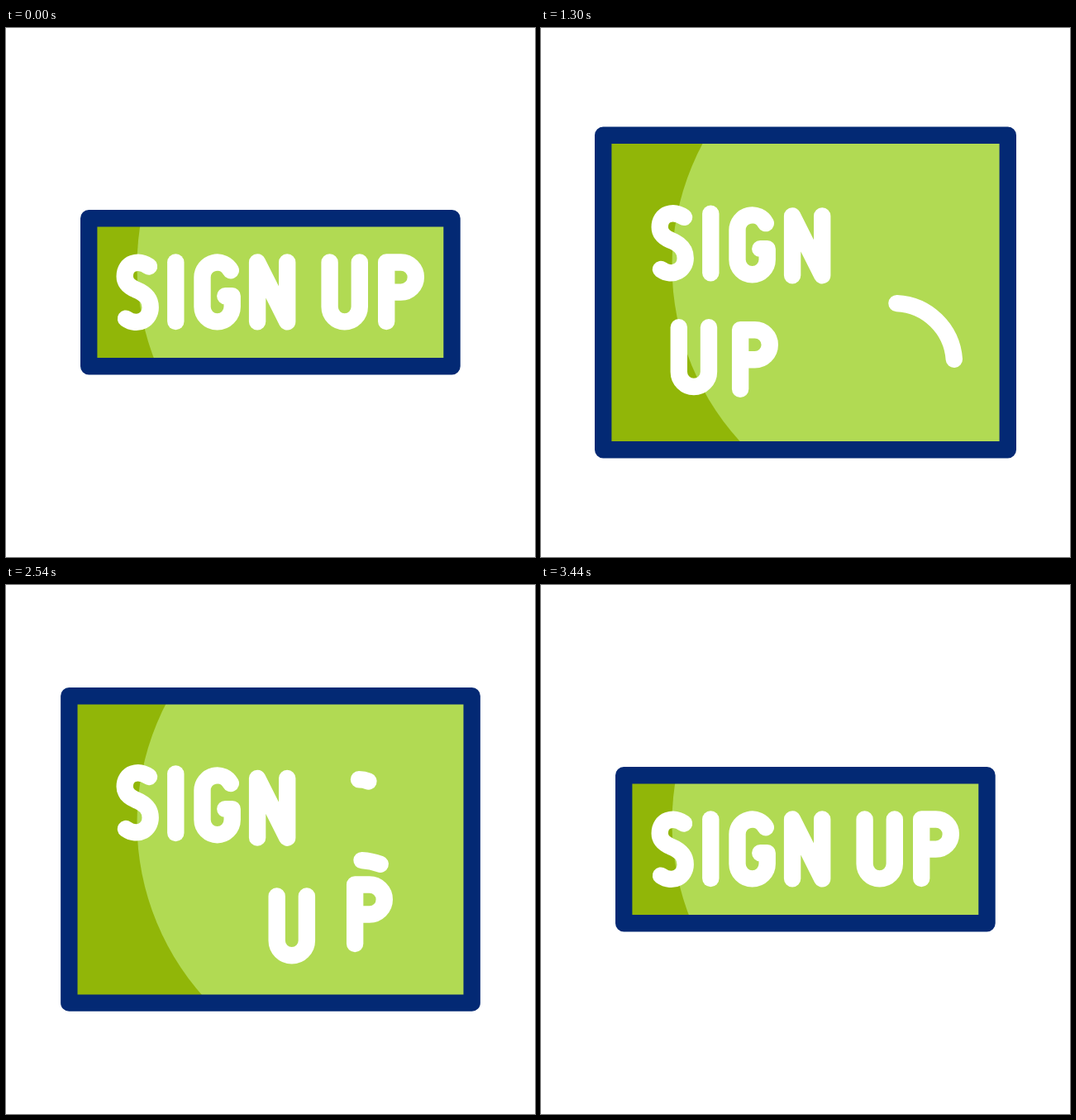
Write an HTML page that moves like this. It is 640 px wide and 640 px high and loops after 3600 ms.

```html
<!DOCTYPE html>
<html lang="en">
<head>
<meta charset="utf-8">
<title>Sign up</title>
<style>
  @property --p { syntax: "<number>"; inherits: true; initial-value: 0; }

  html, body { margin: 0; width: 100%; height: 100%; overflow: hidden; background: #fff; }
  svg { display: block; width: 100vw; height: 100vh; }

  svg, .letter, .trim {
    animation: 3600ms cubic-bezier(.95, 0, .15, 1) infinite;
  }

  /* --p runs from 0 (button) to 1 (card) and back */
  svg { animation-name: card; }
  .box {
    x: calc(100.2px - 25.5px * var(--p));
    y: calc(230.2px - 102.5px * var(--p));
    width: calc(439.3px + 51.3px * var(--p));
    height: calc(179px + 205.5px * var(--p));
  }
  .dark { fill: #91b608; }
  .light { fill: #b1da53; }
  .edge { fill: none; stroke: #032974; stroke-width: 20.4; stroke-linejoin: round; }

  .ink { fill: none; stroke: #fff; stroke-width: 20.4; stroke-linecap: round; stroke-linejoin: round; }
  .letter { transform: translateY(calc(-61px * var(--p))); }
  .s { animation-name: s; }
  .i { animation-name: i; }
  .g { animation-name: g; }
  .n { animation-name: n; }

  /* second word follows a cubic curve, written as a polynomial in --p */
  .curve {
    transform: translate(
      calc(1px * var(--p) * (var(--a) + var(--p) * (var(--b) + var(--p) * var(--c)))),
      calc(1px * var(--p) * (435 + var(--p) * (-501 + var(--p) * 129))));
  }
  .u { animation-name: u; --a: -126; --b: -264; --c: 143; }
  .p { animation-name: p; --a: -75; --b: -366; --c: 194; }

  .trim { stroke-dasharray: 100 200; stroke-dashoffset: 100; visibility: hidden; }
  .body { animation-name: body; }
  .head { animation-name: head; }

  @keyframes card {
    0%, 6.75% { --p: 0; }
    42.56%, 60.3% { --p: 1; animation-timing-function: cubic-bezier(.85, 0, .05, 1); }
    96.1%, 100% { --p: 0; }
  }
  @keyframes s {
    0%, 6.53% { --p: 0; }
    43.2%, 59.75% { --p: 1; animation-timing-function: cubic-bezier(.85, 0, .05, 1); }
    95.56%, 100% { --p: 0; }
  }
  @keyframes i {
    0%, 6.94% { --p: 0; }
    45%, 58.58% { --p: 1; animation-timing-function: cubic-bezier(.85, 0, .05, 1); }
    94.39%, 100% { --p: 0; }
  }
  @keyframes g {
    0%, 10.36% { --p: 0; }
    46.47%, 57.67% { --p: 1; animation-timing-function: cubic-bezier(.85, 0, .05, 1); }
    93.47%, 100% { --p: 0; }
  }
  @keyframes n {
    0%, 17.06% { --p: 0; }
    44.83%, 56.33% { --p: 1; animation-timing-function: cubic-bezier(.85, 0, .05, 1); }
    92.14%, 100% { --p: 0; }
  }
  @keyframes u {
    0%, 11.22% { --p: 0; }
    48.25%, 53.39% { --p: 1; animation-timing-function: cubic-bezier(.85, 0, .05, 1); }
    88.61%, 100% { --p: 0; }
  }
  @keyframes p {
    0%, 11.58% { --p: 0; }
    49.25%, 53.11% { --p: 1; animation-timing-function: cubic-bezier(.85, 0, .05, 1); }
    87.25%, 100% { --p: 0; }
  }
  @keyframes body {
    0%, 27.3% { stroke-dashoffset: 100; visibility: hidden; }
    45%, 58.5% { stroke-dashoffset: 0; visibility: visible; animation-timing-function: cubic-bezier(.85, 0, .05, 1); }
    76.28%, 100% { stroke-dashoffset: 100; visibility: hidden; }
  }
  @keyframes head {
    0%, 36.2% { stroke-dashoffset: 100; visibility: hidden; }
    53.3%, 58.6% { stroke-dashoffset: 0; visibility: visible; animation-timing-function: cubic-bezier(.85, 0, .05, 1); }
    76.2%, 100% { stroke-dashoffset: 100; visibility: hidden; }
  }
</style>
</head>
<body>
<svg viewBox="0 0 640 640" role="img" aria-label="SIGN UP">
  <clipPath id="inside"><rect class="box"/></clipPath>
  <rect class="box dark"/>
  <g clip-path="url(#inside)"><circle class="light" cx="473.5" cy="288" r="315"/></g>
  <rect class="box edge"/>

  <g class="ink">
    <path class="trim body" pathLength="100" d="M430.5 333.1A73 73 0 0 1 500 405.5Q427 436.5 354 405.5A73 73 0 0 1 430.5 333.1"/>
    <path class="trim head" pathLength="100" d="M427 235.3a31.3 31.3 0 0 1 0 62.6a31.3 31.3 0 0 1 0 -62.6"/>

    <path class="letter s" d="M173 288.5C160 279.5 143.7 284 143.7 300.5C143.7 308 149 313 157 316.5C168 321 174.7 327 174.7 338C174.7 352 160 362 145 351.6"/>
    <path class="letter i" d="M205.3 283.4V355"/>
    <path class="letter g" d="M271.8 293.3A18.2 18.2 0 0 0 237.5 301.6V337.3A18.1 18.1 0 0 0 273.7 337.3V324.3H265.3"/>
    <path class="letter n" d="M304.1 355.3V283.5L340.2 355.3V283.5"/>
    <path class="letter curve u" d="M391.6 283.5V337.3A18.1 18.1 0 0 0 427.8 337.3V283.5"/>
    <path class="letter curve p" d="M460.2 355V283.5H477.8A18 18 0 0 1 477.8 319.6H460.2"/>
  </g>
</svg>
</body>
</html>
```
